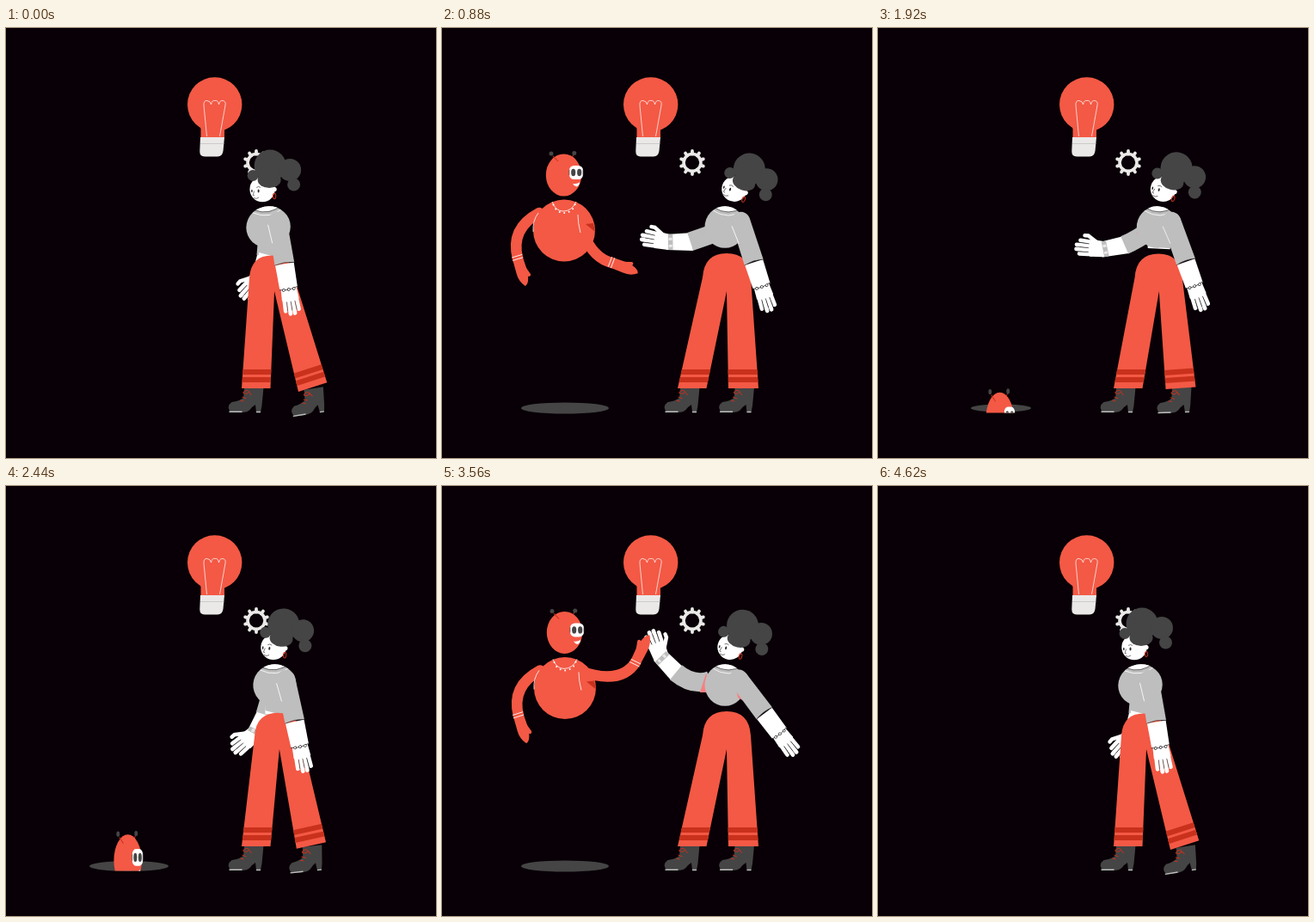
Recreate the animation shown at these times as an HTML page with a canvas. Size 500 px wide and 500 px high, loop 4.64 s.

```html
<!DOCTYPE html>
<html>
<head>
<meta charset="utf-8">
<style>
html, body { margin: 0; width: 100%; height: 100%; overflow: hidden; background: #080006; }
canvas { display: block; width: 500px; height: 500px; }
</style>
</head>
<body>
<canvas id="stage" width="500" height="500"></canvas>
<script>
const g = document.getElementById('stage').getContext('2d');
const PERIOD = 2320;
const RED = '#f35945', DARK_RED = '#c9311c', CHARCOAL = '#454545', GREY = '#bebebe',
      LIGHT = '#ebe9e8', WHITE = '#fff', PINK = '#f77f80', INK = '#2a2628';

// ---- drawing helpers ----
function fill(d, color) { g.fillStyle = color; g.fill(new Path2D(d)); }
function line(d, color, width = 0.8, cap = 'butt') {
  g.strokeStyle = color;
  g.lineWidth = width;
  g.lineCap = cap;
  g.stroke(new Path2D(d));
}
function oval(x, y, rx, ry, color) {
  g.beginPath();
  g.ellipse(x, y, rx, ry, 0, 0, 7);
  g.fillStyle = color;
  g.fill();
}
const dot = (x, y, r, color) => oval(x, y, r, r, color);
function ring(x, y, rx, ry, color, width) {
  g.beginPath();
  g.ellipse(x, y, rx, ry, 0, 0, 7);
  g.strokeStyle = color;
  g.lineWidth = width;
  g.stroke();
}
function within(x, y, degrees, draw) {
  g.save();
  g.translate(x, y);
  g.rotate(degrees * Math.PI / 180);
  draw();
  g.restore();
}
function faded(alpha, draw) {
  g.globalAlpha = alpha;
  draw();
  g.globalAlpha = 1;
}

// ---- motion helpers ----
const lerp = (a, b, k) => a + (b - a) * k;
const clamp = (v, lo = 0, hi = 1) => Math.min(hi, Math.max(lo, v));
const ramp = (t, from, to) => clamp((t - from) / (to - from));
const smooth = (t, from, to) => { const u = ramp(t, from, to); return u * u * (3 - 2 * u); };
const polar = ([x, y], degrees, length) =>
  [x + length * Math.cos(degrees * Math.PI / 180), y + length * Math.sin(degrees * Math.PI / 180)];

function bulb(t) {
  dot(242.7, 89, 31.7, RED);
  fill('M222 108L226.500 117V128H254V117L264 108Z', RED);
  fill('M226 127H254L252.500 143Q251.500 149.500 246 149.500H231Q225 149.500 225.300 143Z', LIGHT);
  line('M226 134.500H253.500', GREY, 0.7);
  line('M233.500 126L230 90Q229.500 84 234 84.500Q238 85 238.500 89Q239.500 83.500 243 84.500' +
       'Q246.500 83.500 247.500 89Q248.500 84 252 84.500Q256 85 255 90L248.500 126', WHITE, 0.7);
  if (t < 1300 || t > 1720) return;
  const length = 14 * Math.abs(Math.sin(Math.PI * (t - 1300) / 210));
  for (let i = 0; i < 5; i++) {
    within(243, 89, 188 + i * 44, () => line(`M33 0h${length}`, RED, 1.2));
  }
}

function gear() {
  const teeth = 10;
  for (let i = 0; i < teeth; i++) {
    within(291, 156.5, i * 360 / teeth, () => line('M0 -10V-13.500', LIGHT, 3.8, 'round'));
  }
  ring(291, 156.5, 10, 10, LIGHT, 3.6);
}

function hand(x, y, degrees, thumb) {
  within(x, y, degrees - 90, () => {
    fill('M-9 -1H9L10 15Q0 22 -10 15Z', WHITE);
    for (let i = -1.5; i < 2; i++) {
      line(`M${i * 4.7} 13L${i * 5.2} ${32 - 2 * i * i}`, WHITE, 4.7, 'round');
    }
    for (let i = -1; i < 2; i++) line(`M${i * 4.7} 17L${i * 5.5} 28`, INK, 0.6);
    if (thumb) line('M-7 8L-14 19L-14 23', WHITE, 4.5, 'round');
  });
}

function shoe(x, y, degrees) {
  within(x, y, degrees, () => {
    fill('M-11.500 -1H11L9 20L7.500 28H2.500L1.500 19Q-2 21 -5 25Q-8 28 -14 28H-27' +
         'Q-33 21 -26 16Q-17 15 -12.500 11Z', CHARCOAL);
    line('M-29 27.300H-14M2.500 27.500H7.500', GREY, 1.4);
    line('M-13 5Q-8 0 -6 4Q-8 8 -13 5M-6 4L-3 8M-14 10L-9 12M-16 14L-12 15', DARK_RED, 1);
  });
}

function farArm(shoulder, upper, upperLength, fore, palm, sag) {
  const [x, y] = shoulder, elbow = polar(shoulder, upper, upperLength), length = 25;
  hand(...polar(elbow, fore, length), palm, true);
  within(...elbow, fore, () => {
    fill(`M-3 -10.500L${length + 3} -9V9L-3 10.500Z`, WHITE);
    line(`M${length - 2} -9V9`, GREY, 5.5);
    line(`M${length - 2} -6v3m0 5v3`, LIGHT, 4);
  });
  line(`M${x} ${y}Q${(x + elbow[0]) / 2} ${(y + elbow[1]) / 2 + sag} ${elbow}`, GREY, 22);
}

// stand: 0 while striding, 1 with both feet level
function trousers(stand) {
  const at = (a, b) => lerp(a, b, stand);
  const hipL = at(283, 303), hipR = at(335, 359), top = at(264.5, 262), mid = (hipL + hipR) / 2;
  const x = at(340, 333), y = at(423, 419), tilt = at(-18, 0), cuff = 35;
  const [endX, endY] = polar([x, y], tilt, cuff);
  shoe(288.5, 419, 0);
  shoe((x + endX) / 2 + 1.5, (y + endY) / 2 - tilt / 8, tilt / 2);
  const shape = new Path2D(`M274 419L${hipL} 290Q${hipL + 2} ${top} ${mid} ${top}` +
    `Q${hipR - 2} ${top} ${hipR} 290L${endX} ${endY}L${x} ${y}L${at(312, 331)} 306L307.500 419Z`);
  g.save();
  g.fillStyle = RED;
  g.fill(shape);
  g.clip(shape);
  line('M270 400H320M270 409H320', DARK_RED, 6);
  within(x, y, tilt, () => line('M-8 -19H40M-8 -10H40', DARK_RED, 6));
  g.restore();
}

function bust(x, tilt, rx, blush) {
  faded(blush, () => fill('M307 218L300 240H314Z', PINK));
  within(x, 231.5, tilt, () => {
    oval(0, 0, rx, 24.3, GREY);
    g.save();
    g.clip();
    oval(4, -24, 14.5, 6, WHITE);
    line('M-13 -23Q4 -12 21 -23', INK, 0.6);
    line('M-15 -20Q4 -7 23 -20', WHITE);
    g.restore();
  });
  faded(blush, () => fill('M341 232L351 250L344 246Z', PINK));
}

function nearArm(x, degrees, highlight) {
  within(x, 222, -degrees, () => {
    hand(0, 80, 90, false);
    fill('M-11 53H11L10.500 82H-10.500Z', WHITE);
    line('M-11 82Q0 85 11 81', INK, 0.7);
    for (let i = -1; i < 2; i++) {
      dot(i * 6, 83, 1.8, INK);
      dot(i * 6, 83, 1.1, WHITE);
    }
    dot(0, 3, 11, GREY);
    fill('M-11 3H11L11.500 53Q0 50 -11.500 53Z', GREY);
    line('M-11.500 53Q0 50 11.500 53', INK, 0.6);
    faded(highlight, () => line('M-11.500 5L-10 27', WHITE));
  });
}

function womanHead(x, degrees) {
  within(x, 187.5, degrees, () => {
    dot(-1, 0, 14.7, WHITE);
    dot(13, 0, 2.6, WHITE);
    oval(7, -11, 13.5, 9.5, CHARCOAL);
    dot(8, -27.5, 18.5, CHARCOAL);
    dot(31, -22.5, 13, CHARCOAL);
    dot(35.5, -5.5, 7.5, CHARCOAL);
    dot(-12, -16, 6.5, CHARCOAL);
    oval(-13.2, 2, .8, 1.8, INK);
    oval(-5.5, 2, 1, 1.9, INK);
    line('M-8 -2Q-5.500 -4 -3 -2M-10.500 2L-12 7L-10 7.500M-11 10Q-8 12 -5 9.500', INK, 0.6);
    ring(13, 8, 1.7, 3.2, DARK_RED, 1);
  });
}

function woman(t) {
  const leaving = smooth(t, 1760, 2290);
  const stand = (1 - (1 - ramp(t, 0, 880)) ** 2.5) * (1 - leaving);
  const raise = smooth(t, 850, 1230) * (1 - smooth(t, 1740, 1990));
  const pose = (stride, level, clap = level) => lerp(lerp(stride, level, stand), clap, raise);
  const swing = (down, level, clap) => lerp(lerp(down, level, stand ** 1.5), clap, raise);

  const x = pose(305, 329);
  farArm([pose(305, 322, 312), pose(235, 237, 226)], swing(95, 160, 193), pose(30, 35, 41),
         swing(107, 178, 226), swing(130, 189, 249), 12 * raise);
  const waist = clamp(1.6 * (1 - stand));
  if (waist > 0) {
    fill(`M${x - 11} 245H${x + 15}V${251 + 18 * waist}L${x - 11} ${251 + 14 * waist}Z`, WHITE);
    fill(`M${x - 12} 245H${x + 15}V${250 + 18 * waist}L${x - 11} ${250 + 11 * waist}Z`, GREY);
  }
  trousers(stand);
  bust(x, pose(-11, 0), pose(25.8, 23.5), raise);
  nearArm(pose(315, 346.5, 343), pose(9.5, 17.5, 37), 1 - raise);
  womanHead(pose(299, 341, 336), pose(0, 19, 12));
}

function alienArm(shoulder, elbow, wrist, palm, length) {
  line(`M${shoulder}Q${elbow} ${wrist}`, RED, 12.5, 'round');
  within(...wrist, palm, () => {
    fill(`M-2 -6L${length * .5} -6.500Q${length} -5 ${length + 1} 1` +
         `Q${length * .8} 7 ${length * .5} 6.500L-2 6Z`, RED);
    line(`M10 -3L${length * .68} -7`, RED, 4, 'round');
    line('M-3 -6.300V6.300M0.500 -6.300V6.300', WHITE);
  });
}

// Height below the floating position: launch, springy settling, then a dive with a wind-up
function alienDrop(t) {
  const DEPTH = 320;
  if (t < 220) return DEPTH * (1 - ramp(t, 45, 220) ** 2);
  const s = t - 220, u = ramp(t, 1620, 1930);
  return -52 * Math.exp(-.004 * s) * Math.sin(2 * Math.PI * s / 260)
    + DEPTH * (2.7 * u ** 3 - 1.7 * u ** 2);
}

function alien(t) {
  const size = smooth(t, 0, 150) * (1 - smooth(t, 1880, 1990));
  if (size <= 0) return;
  oval(143, 442, 51 * size, 6.6 * size, CHARCOAL);
  const drop = alienDrop(t), stretch = clamp(drop / 262);
  const raise = smooth(t, 850, 1230) * (1 - smooth(t, 1540, 1785));
  const at = (low, high) => lerp(low, high, raise);
  g.save();
  g.beginPath();
  g.rect(0, 0, 500, 447.5);
  g.clip();
  g.translate(143 - (1 - raise), 145 + drop);
  g.scale(1 - .22 * stretch, 1 + .24 * stretch);
  g.translate(-143, -145);

  alienArm([114, 214], [80, 232], [89, 267], 72 + clamp(drop, -40, 10), 32);
  dot(143, 234.5, 36, RED);
  fill('M168 227L177 226L179 236Z', DARK_RED);
  const shoulder = [at(165, 161), at(238, 215)];
  const elbow = polar(shoulder, at(68, 19) + 20 * stretch, at(32, 50));
  const wrist = polar(elbow, at(13, -58) + 70 * stretch, at(22, 32));
  alienArm(shoulder, elbow, wrist, at(22, -64) + 70 * stretch, at(31, 34));
  line('M113 214Q106 223 107 236M159 216Q159 226 162 237', WHITE);
  line('M129 201Q133 212 142 212Q152 212 157 201', WHITE);
  for (let i = 0; i < 7; i++) dot(...polar([143, 201], 14 + i * 25, 13), 1, WHITE);

  line('M154.500 145L151 152', DARK_RED, 1);
  oval(142.5, 170, 20.7, 24.5, RED);
  line('M130 148L136 154', DARK_RED, 1);
  dot(128, 145, 2.5, CHARCOAL);
  dot(154.8, 144.5, 2.5, CHARCOAL);
  g.beginPath();
  g.roundRect(149, 159, 16, 16, 5.5);
  g.fillStyle = WHITE;
  g.fill();
  line('M149 164V170M165 164V170', CHARCOAL, 0.7);
  oval(153.7, 167, 2.6, 4.2, CHARCOAL);
  oval(160.7, 167, 2.6, 4.2, CHARCOAL);
  fill('M153 180Q157 181 161 178.500Q161 182 157.500 183.500Q154.500 183 153 180Z', WHITE);
  g.restore();
}

function frame() {
  const t = performance.now() % PERIOD;
  g.fillStyle = '#080006';
  g.fillRect(0, 0, 500, 500);
  bulb(t);
  gear();
  woman(t);
  alien(t);
  requestAnimationFrame(frame);
}
frame();
</script>
</body>
</html>
```
